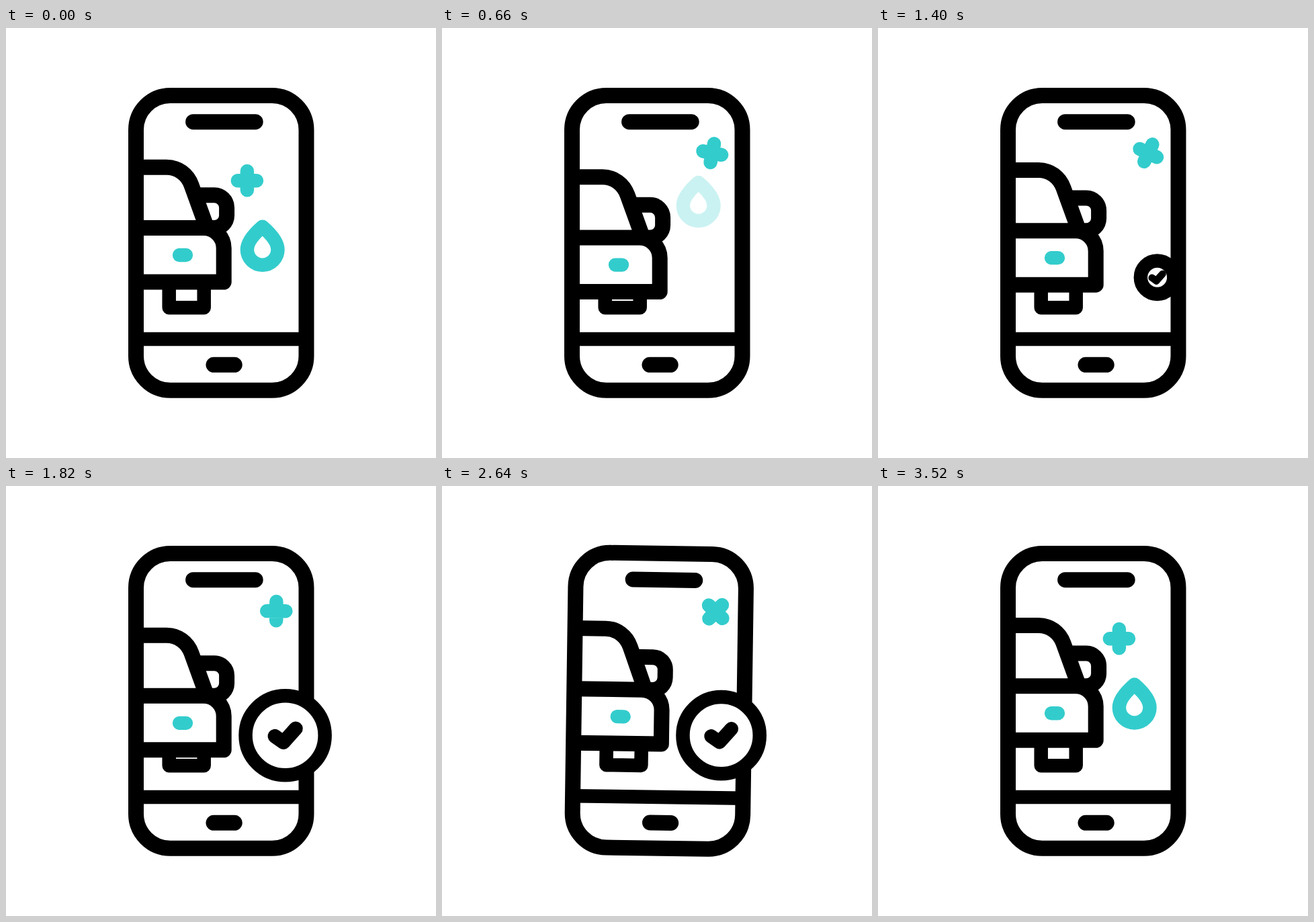
An HTML page that plays this animation: 640 by 640 pixels, repeating every 3600 ms.

```html
<!DOCTYPE html>
<html lang="en">
<head>
<meta charset="utf-8">
<title>Car wash app</title>
<style>
  html, body { margin: 0; width: 100%; height: 100%; overflow: hidden; background: #fff; }
  svg { display: block; width: 100vw; height: 100vh; }
  .line { fill: none; stroke: #000; stroke-width: 23; stroke-linejoin: round; }
  .thin { stroke-width: 20.5; }
  .round { stroke-linecap: round; }
  .teal { stroke: #33cccc; }
</style>
</head>
<body>
<svg viewBox="0 0 640 640">
  <g id="phone">
    <path class="line thin" d="M242.7 385V416.3H294.7V385"/>
    <g id="car">
      <path class="line" d="M193.5 207.3H239C255.5 207.3 270 217.5 276 234L297 292"/>
      <path class="line" d="M285 248.8H310A18.6 18.6 0 0 1 328.6 267.4V279A18.6 18.6 0 0 1 310 297.5H300"/>
      <path class="line" d="M193.5 297.5H294A30.2 30.2 0 0 1 324.2 327.7V378H193.5"/>
      <path class="line round" id="lamp" d="M258 338H268"/>
    </g>
    <path class="line thin" d="M193.5 463H447"/>
    <rect class="line" x="193.5" y="100.4" width="253.5" height="438.8" rx="51"/>
    <path class="line round" id="slot" d="M278.6 139.7H371.2"/>
    <path class="line round" id="button" d="M309 501.3H340.2"/>
    <path class="line thin round teal" id="plus" d="M-14.1 0H14.1M0 -14.1V14.1"/>
  </g>
  <path class="line thin teal" id="drop" d="M381.7 295.5C373 303 358.9 317 358.9 329.7A22.8 22.8 0 0 0 404.5 329.7C404.5 317 390.4 303 381.7 295.5Z"/>
  <g id="badge" transform="translate(415.6 371.2)">
    <circle class="line" id="ring" style="fill:#fff"/>
    <path class="line thin round" id="tick" d="M-15.1 1.1L-2.6 10L15.2 -9.9"/>
  </g>
</svg>
<script>
const LOOP = 3600, END = 3520, STEP = 560;
const TEAL = '#33cccc', BLACK = '#000';
const $ = id => document.getElementById(id);
const [phone, car, lamp, slot, button, plus, drop, badge, ring, tick] =
  ['phone', 'car', 'lamp', 'slot', 'button', 'plus', 'drop', 'badge', 'ring', 'tick'].map($);

const clamp = (v, lo, hi) => Math.max(lo, Math.min(hi, v));
const mix = (a, b, p) => a + (b - a) * p;
const wave = p => (1 - Math.cos(Math.PI * p)) / 2;
const ramp = (t, start, end) => clamp((t - start) / (end - start), 0, 1);
const ease = (t, start, end) => wave(ramp(t, start, end));
const move = (el, value) => el.setAttribute('transform', value);

function paint(el, color, width) {
  el.style.stroke = color;
  el.style.strokeWidth = width;
}

// Tilts right, left, right and back, in equal eased steps
function swing(t) {
  const turn = i => ease(t, 1904 + 280 * i, 2184 + 280 * i);
  return 2 * turn(0) - 4 * turn(1) + 4 * turn(2) - 2 * turn(3);
}

function drawPlus(t) {
  const away = ease(t, 0, STEP) - ease(t, END - STEP, END);
  const spin = 336 * Math.pow(ramp(t, STEP, 2780), 1.1) + 24 * ease(t, END - STEP, END);
  move(plus, `translate(${mix(358.9, 402.3, away)} ${mix(227.2, 186.1, away)}) rotate(${spin})`);
}

// Falls out below and in from above, hides behind the badge, then falls in again
function drawDrop(t) {
  const fall = t < 1400 ? (t / STEP + 1) % 2 - 1 : clamp((t - END) / STEP, -1, 0);
  move(drop, `translate(0 ${80 * fall})`);
  const hide = t < 1400 ? ramp(t, 2 * STEP, 1380) : 0;
  drop.style.opacity = Math.pow(1 - Math.abs(fall), 0.8) * (1 - hide);
}

function drawBadge(t, swap) {
  const size = 1.2 * ease(t, 1200, 1640) - 0.2 * ease(t, 1640, 1880) - ease(t, 2980, 3260);
  badge.style.display = size > 0.01 ? '' : 'none';
  const outer = Math.max(0, (swap ? 68.5 : 67.4) * size);
  const width = Math.min(swap ? 23 : 20.5, outer);
  paint(ring, swap ? TEAL : BLACK, width);
  ring.setAttribute('r', Math.max(0.01, outer - width / 2));
  move(tick, `scale(${size})`);
}

function draw(time) {
  const t = Math.min(time, END);
  const swap = t >= 2800 && t < 3120;
  move(phone, `rotate(${swing(t)} 324.7 537)`);
  move(car, `translate(0 ${15 * wave(t / 595)})`);
  paint(lamp, swap ? BLACK : TEAL, 20.3);
  for (const el of [slot, button]) paint(el, swap ? TEAL : BLACK, swap ? 20.5 : 23);
  drawPlus(t);
  drawDrop(t);
  drawBadge(t, swap);
}

const begin = performance.now();
function frame() {
  draw((performance.now() - begin) % LOOP);
  requestAnimationFrame(frame);
}
frame();
</script>
</body>
</html>
```
